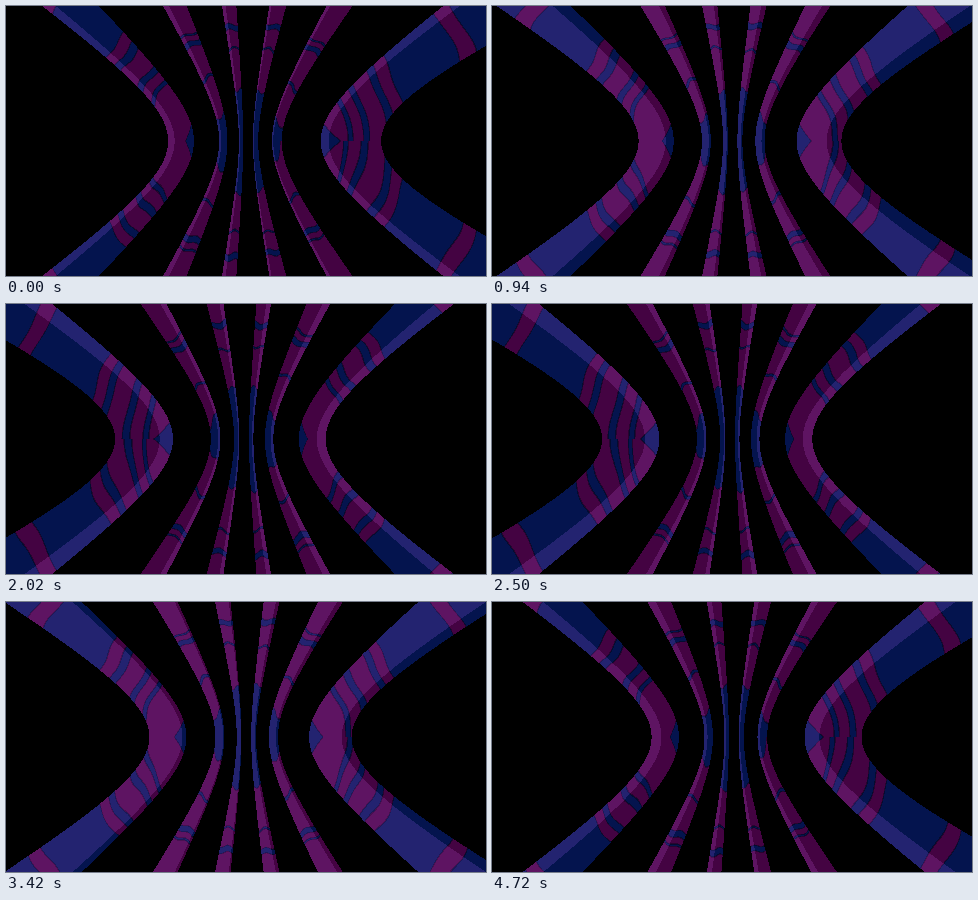
Write an HTML page with a canvas that moves like this. It is 480 px wide and 270 px high and loops after 4.74 s.

```html
<!DOCTYPE html>
<html lang="en">
<head>
<meta charset="utf-8">
<title>Bent pillars</title>
<style>
html, body { margin: 0; width: 100%; height: 100%; overflow: hidden; background: #000; }
canvas { display: block; width: 480px; height: 270px; }
</style>
</head>
<body>
<canvas id="stage" width="480" height="270"></canvas>
<script>
const W = 480, H = 270, CX = 239.5, CY = 134.5;
const LOOP = 4740, STEP = 20, SWING = 4390, PEAK = 25;
const RAD = Math.PI / 180;

const ctx = document.getElementById('stage').getContext('2d');
const image = ctx.createImageData(W, H);
const pixels = new Uint32Array(image.data.buffer);

const rgb = (r, g, b) => (255 << 24 | b << 16 | g << 8 | r) >>> 0;
const BLACK = rgb(0, 0, 0);
// [dark face, light face, dark seam, light seam]
const NAVY = [rgb(4, 20, 78), rgb(35, 35, 112), rgb(3, 12, 48), rgb(27, 25, 88)];
const PURPLE = [rgb(68, 3, 66), rgb(94, 20, 98), rgb(40, 4, 46), rgb(72, 16, 80)];

// Edges are [rest, swing, spread]; cuts are radii where the colour flips.
const rows = [
  { outer: [101, 29.2, 5.7], inner: [61.3, 11.5, 2.2], navyFirst: false,
    cuts: [99, 104, 115, 122, 141, 149, 161, 230, 246] },
  { outer: [31.3, 4.5, 0], inner: [22.3, 3.8, 0], navyFirst: true,
    cuts: [37, 71, 74, 109, 115, 121, 123] },
  { outer: [9.7, 2.6, 0], inner: [4.85, 2.1, 0], navyFirst: true,
    cuts: [52, 92, 94, 113, 119] }
];

// Plan distance of the hyperbola through each pixel of one quadrant.
const HALF_W = W / 2, HALF_H = H / 2;
const plan = new Float32Array(HALF_W * HALF_H);
for (let j = 0; j < HALF_H; j++) {
  for (let i = 0; i < HALF_W; i++) {
    const dx = i + 0.5, dy = j + 0.5;
    let a = dx / 2;
    for (let n = 0; n < 20; n++) a = dx / Math.sqrt(1 + dy * dy / (1630 + 19 * a));
    plan[j * HALF_W + i] = a;
  }
}

function swingAt(t) {
  const angle = 2 * Math.PI * (t - PEAK) / SWING;
  const reach = 0.94 + 0.08 * Math.exp(-t / 500);
  return reach * Math.cos(angle) - 0.04 * Math.cos(3 * angle);
}

const edge = ([rest, swing, spread], q) => rest - swing * q + spread * q * q;

function makePillars(p) {
  const pillars = [];
  for (const side of [-1, 1]) {
    for (const row of rows) {
      const turn = (78 * p + 5 * side) * RAD;
      const c = Math.abs(Math.cos(turn)), s = Math.abs(Math.sin(turn));
      pillars.push({
        row, side, turn,
        inner: edge(row.inner, -side * p),
        outer: edge(row.outer, -side * p),
        lightShare: c / (c + s)
      });
    }
  }
  return pillars;
}

function isLight(pillar, w) {
  const fromLeft = pillar.side < 0 ? 1 - w : w;
  return pillar.turn > 0 ? fromLeft < pillar.lightShare : fromLeft > 1 - pillar.lightShare;
}

function material(pillar, w, dx, dy, p) {
  const { row, side } = pillar;
  const r = Math.hypot(dx, dy);
  const radius = r + 1.6 * Math.sin(r / 13 + 2 * side + Math.sign(dy) + 2 * p)
    + 1.8 * Math.sin(5 * w + r / 19 * Math.sign(dy) + p);

  let navy = row.navyFirst, gap = W;
  for (const cut of row.cuts) {
    if (radius > cut) navy = !navy;
    gap = Math.min(gap, Math.abs(radius - cut));
  }
  if (row === rows[0]) {
    const wedge = 0.33 - 0.02 * Math.abs(dy) - w;
    if (wedge > 0) navy = true;
    gap = Math.min(gap, Math.abs(wedge) * 40);
  }
  return (navy ? NAVY : PURPLE)[(isLight(pillar, w) ? 1 : 0) + (gap < 0.65 ? 2 : 0)];
}

function draw(t) {
  const p = swingAt(t);
  const pillars = makePillars(p);
  for (let y = 0; y < H; y++) {
    const dy = y - CY, j = Math.abs(dy) - 0.5;
    for (let x = 0; x < W; x++) {
      const dx = x - CX, a = plan[j * HALF_W + Math.abs(dx) - 0.5];
      let color = BLACK;
      for (const pillar of pillars) {
        const { side, inner, outer } = pillar;
        if (side * dx <= 0 || a < inner || a > outer) continue;
        color = material(pillar, (a - inner) / (outer - inner), dx, dy, p);
        break;
      }
      pixels[y * W + x] = color;
    }
  }
  ctx.putImageData(image, 0, 0);
}

const start = performance.now();
let shown = -1;
function tick() {
  const t = Math.floor((performance.now() - start) % LOOP / STEP) * STEP;
  if (t !== shown) draw(shown = t);
  requestAnimationFrame(tick);
}
tick();
</script>
</body>
</html>
```
